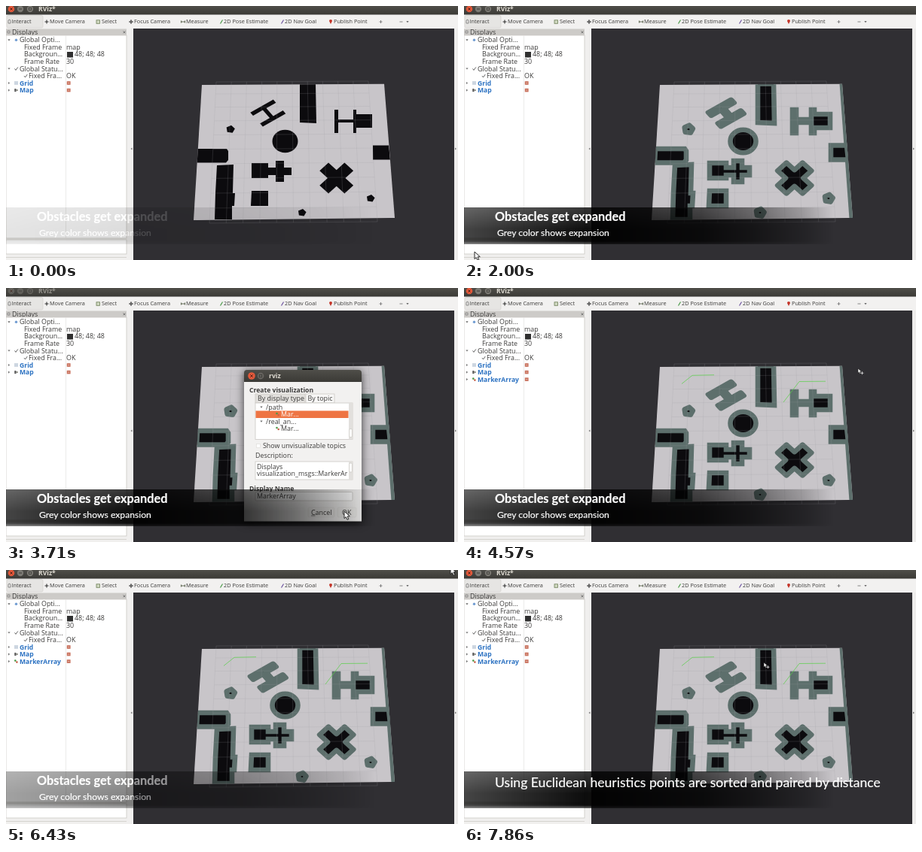
Write an HTML page that moves like this. It is 600 px wide and 338 px high and loops after 8 s.

```html
<!DOCTYPE html>
<html lang="en">
<head>
<meta charset="utf-8">
<title>Obstacle expansion</title>
<style>
  html, body { margin: 0; width: 100%; height: 100%; overflow: hidden; background: #302f33; }
  svg { display: block; width: 100vw; height: 100vh; }
  text { font: 8.9px "Open Sans", "Noto Sans", sans-serif; fill: #3c3b3a; white-space: pre; }
  .b { font-weight: 700; font-size: 8.6px; }
  .tool { font-size: 7.3px; }
  .blue { fill: #2c72c2; }
  .light { fill: #dfdbd2; }
  .title, .sub, .long { font-family: Lato, "Open Sans", sans-serif; fill: #fff; stroke: #fff; stroke-width: .2; }
  .title { font-size: 16.3px; font-weight: 700; }
  .sub { font-size: 12.2px; }
  .long { font-size: 17.6px; }
  #shapes path { fill: #0c0b0e; stroke: #5d6f6c; stroke-width: 0; }
  #shapes.grown path { stroke-width: 6.6; }
  .round { stroke-linejoin: round; }
  #dialog { filter: drop-shadow(0 2px 6px rgba(0,0,0,.7)); }
</style>
</head>
<body>
<svg viewBox="0 0 600 338" preserveAspectRatio="none">
  <defs>
    <linearGradient id="bar" x2="0" y2="1"><stop stop-color="#4f4e49"/><stop offset="1" stop-color="#3b3a36"/></linearGradient>
    <linearGradient id="fade" gradientUnits="userSpaceOnUse" x1="0" x2="490" y1="0" y2="0">
      <stop stop-opacity=".73"/><stop offset=".33" stop-opacity=".95"/><stop offset=".645" stop-opacity=".78"/>
      <stop offset=".785" stop-opacity=".55"/><stop offset=".92" stop-opacity=".25"/><stop offset="1" stop-opacity="0"/>
    </linearGradient>
    <linearGradient id="depth" x2="0" y2="1">
      <stop stop-color="#fff" stop-opacity=".82"/><stop offset=".6" stop-color="#fff"/>
      <stop offset=".92" stop-color="#fff"/><stop offset="1" stop-color="#fff" stop-opacity=".6"/>
    </linearGradient>
    <mask id="soft"><rect y="268" width="600" height="49" fill="url(#depth)"/></mask>
    <clipPath id="floor"><path d="M260 105L502 103.7L516 282L249 285Z"/></clipPath>
    <clipPath id="list"><rect x="331" y="153" width="124" height="61"/></clipPath>
    <clipPath id="note"><rect x="331" y="231" width="122" height="24"/></clipPath>
    <g id="backdrop"><rect y="268" width="490" height="49" fill="url(#fade)" mask="url(#soft)"/></g>
  </defs>

  <rect width="600" height="338" fill="#302f33"/>
  <g id="scene">
    <path d="M260 105L502 103.7L516 282L249 285Z" fill="#c8c5c9"/>
    <g clip-path="url(#floor)">
      <path id="edge" d="M498.5 103H504L518 283L511.5 283Z" fill="#5d6f6c"/>
      <g id="shapes"></g>
    </g>
    <path id="grid" fill="none" stroke="#9d9ba3" stroke-opacity=".32" stroke-width=".6"/>
    <path id="trail" d="M289 127.5L303 116.3L332 115.7M424 152L445 124.5L480 124.2" fill="none" stroke="#58d148" stroke-opacity=".8" stroke-width=".9"/>
  </g>

  <g id="window"></g>
  <g id="dialog">
    <path d="M316 125V113Q316 109 320 109H468Q472 109 472 113V125Z" fill="url(#bar)"/>
    <rect x="316" y="125" width="156" height="185.5" fill="#f2f1f0"/>
    <g id="frame"></g>
    <g id="types"></g>
    <g id="topics"></g>
  </g>

  <g id="first">
    <use href="#backdrop"/>
    <text class="title" x="41" y="286">Obstacles get expanded</text>
    <text class="sub" x="44" y="306">Grey color shows expansion</text>
  </g>
  <g id="second">
    <use href="#backdrop"/>
    <text class="long" x="41" y="289">Using Euclidean heuristics points are sorted and paired by distance</text>
  </g>
  <g id="pointer">
    <path d="M0 0V9.6L2.3 7.6L4 11.3L5.8 10.5L4.2 6.9L7.3 6.7Z" fill="#f4f4f4" stroke="#161616" stroke-width=".9"/>
    <path id="plus" d="M5.5 9.5h6m-3-3v6" stroke="#f4f4f4" stroke-width="1.2"/>
  </g>
</svg>

<script>
const $ = id => document.getElementById(id);
const text = (x, y, s, cls = "", more = "") => `<text x="${x}" y="${y}" class="${cls}" ${more}>${s}</text>`;
const rect = (x, y, w, h, fill, more = "") => `<rect x="${x}" y="${y}" width="${w}" height="${h}" fill="${fill}" ${more}/>`;
const dot = (x, y, r, fill, more = "") => `<circle cx="${x}" cy="${y}" r="${r}" fill="${fill}" ${more}/>`;
const line = (d, stroke, w = 1) => `<path d="${d}" fill="none" stroke="${stroke}" stroke-width="${w}"/>`;
const cross = (x, y, r, c) => line(`M${x - r} ${y - r}l${2 * r} ${2 * r}m0 ${-2 * r}l${-2 * r} ${2 * r}`, c, .9);
const down = (x, y) => `<path d="M${x - 1.6} ${y - 1}h3.2l-1.6 2.2z" fill="#666"/>`;
const right = (x, y) => `<path d="M${x - 1} ${y - 1.6}v3.2l2.2-1.6z" fill="#777"/>`;
const tick = (x, y) => line(`M${x - 2} ${y}l1.5 2l2.8-4`, "#555", .9);
const edge = 'stroke="#cbc8c4" stroke-width=".8"';

// Floor plan
function pentagon(cx, cy, r) {
  const pts = [0, 1, 2, 3, 4].map(i => {
    const a = i * Math.PI * 2 / 5 - 1.4;
    return (cx + r * Math.cos(a)).toFixed(1) + " " + (cy + r * .9 * Math.sin(a)).toFixed(1);
  });
  return `M${pts.join("L")}Z`;
}
const solid = [
  "M390 103.5H411L412 156L390 155Z",
  "M254 190H293L295 193V205L292 208.5H253Z",
  "M487 185.5H508L510 204.5H487Z",
  "M280 212L302 211L301 249H304L303 266H300V284H277L278 249Z",
  "M326 209H348V215H358V206H369V215H379V225H369V234H358V225H348V229H326Z",
  "M326 246H348V266H325Z",
  "M436 138H441V151H461V138H465V144H486V162H465V169H461V155H441V169H436Z"
];
const rounded = [
  ["M-17.5-12.2h35v5.4h-14.8v13.6h14.8v5.4h-35v-5.4h14.8v-13.6h-14.8z", "translate(347.8 142.5) rotate(-29.5) skewX(12)"],
  ["M-8-22.5H8V-8H22.5V8H8V22.5H-8V8H-22.5V-8H-8Z", "translate(438.7 229) scale(1.04 .95) rotate(45)"],
  ["M353.5 180a17 15.3 0 1 0 34 0a17 15.3 0 1 0-34 0z", ""],
  [pentagon(298, 164, 6), ""], [pentagon(393, 275, 5.7), ""], [pentagon(484, 256, 5.7), ""]
];
$("shapes").innerHTML = solid.map(d => `<path d="${d}"/>`).join("") +
  rounded.map(([d, t]) => `<path class="round" d="${d}" transform="${t}"/>`).join("");

let cells = "";
for (let i = 0; i <= 10; i++) {
  const k = i / 10, v = Math.pow(k, 1.07);
  cells += `M${279 + 202 * k} ${101 - k}L${270 + 223 * k} ${289 - 2 * k}`;
  cells += `M${279 - 9 * v} ${101 + 188 * v}L${481 + 12 * v} ${100 + 187 * v}`;
}
$("grid").setAttribute("d", cells);

// Main window
const tools = [[7.5, "Interact"], [58, "Move Camera"], [127, "Select"], [170, "Focus Camera"], [239, "Measure"],
  [289, "2D Pose Estimate"], [370, "2D Nav Goal"], [435, "Publish Point"]];
const rows = [["Global Opti...", 18], ["Fixed Frame", 24, "map"], ["Backgroun...", 24], ["Frame Rate", 24, "30"],
  ["Global Statu...", 18], ["Fixed Fra...", 30, "OK"]];
const rowY = i => 45.2 + 9.55 * i;
const plugin = (i, name) => right(4, rowY(i)) + text(18, rowY(i) + 3.1, name, "b blue") +
  rect(80.8, rowY(i) - 2.3, 4.8, 4.6, "#c8705c") + line(`M82 ${rowY(i)}h2.4`, "#f0d4cb", .7);

$("window").innerHTML =
  rect(0, 0, 600, 11.5, "url(#bar)") + `<g id="caption">` +
  dot(7, 4, 4.3, "#e2583a", 'id="close"') + cross(7, 4, 1.5, "#4a2018") +
  dot(19, 4, 4.2, "#7b7973") + line("M17 4h4", "#3c3b37") +
  dot(32, 4, 4.2, "#7b7973") + `<rect x="30.3" y="2.5" width="3.4" height="3" fill="none" stroke="#3c3b37" stroke-width=".8"/>` +
  text(43, 7.2, "RViz*", "b light") + `</g>` +
  rect(0, 11.5, 600, 18.5, "#f2f1f0") +
  rect(1, 12.5, 48, 16.5, "#e6e5e3", 'rx="2" stroke="#d0cdc9" stroke-width=".6"') +
  tools.map(([x, s]) => text(x, 23.3, s, "tool")).join("") +
  line("M3 23v-4l2-1l1 2v3z", "#777", .8) +
  line("M51.5 21h5m-2.5-2.5v5", "#333", 1.1) +
  `<rect x="120" y="18.8" width="4.5" height="4.5" fill="#cfd8c0" stroke="#6e7f58" stroke-width=".8"/>` +
  line("M163 21h6m-3-3v6", "#444", .9) + dot(166, 21, 1.5, "none", 'stroke="#444" stroke-width=".7"') +
  line("M232.5 21h5m-5-1.5v3m5-3v3", "#5d6650", 1) +
  line("M284.5 23.5l3-5", "#4a9a48", 1.2) + line("M365.5 23.5l3-5", "#6d52a0", 1.2) +
  `<path d="M431 24l-2-4a2 2 0 1 1 4 0z" fill="#c43428"/>` +
  line("M495.5 21h4m-2-2v4", "#777", .9) + line("M522.5 21h4", "#777", .9) + down(533, 21) +
  rect(0, 30, 169, 308, "#f0efee") +
  rect(0, 30.5, 160, 8.5, "#cdcbc8") + text(8, 37.8, "Displays") +
  line("M2 36h3v-3h-3z", "#777", .7) + cross(157, 34.8, 1.4, "#666") +
  rect(0, 39, 160, 270, "#fff", edge) + line("M79.5 39V309", "#e4e3e1", .7) +
  rect(0, 311, 160, 19, "#fff", edge) + line("M0 334.5H160", "#cfccc8", .8) +
  rows.map(([s, x, v], i) => text(x, rowY(i) + 3.1, s) + (v ? text(80, rowY(i) + 3.1, v) : "")).join("") +
  rect(81, 61, 8, 7.5, "#303030") + text(91, rowY(2) + 3.1, "48; 48; 48") +
  down(4, rowY(0)) + down(4, rowY(4)) + dot(13.5, rowY(0), 1.7, "#6f9bd1") +
  tick(13.5, rowY(4)) + tick(26, rowY(5)) +
  plugin(6, "Grid") + line(`M11 ${rowY(6)}h5m-5-1.7h5m-5 3.4h5`, "#8aa0b8", .7) +
  plugin(7, "Map") + rect(11.3, rowY(7) - 2, 2.2, 4, "#555") + rect(13.5, rowY(7) - 1, 2.2, 2, "#8a8a80") +
  `<g id="marker">${plugin(8, "MarkerArray")}${dot(12.3, rowY(8) - 1, 1.3, "#4a9a48")}${dot(14.4, rowY(8) + 1, 1.3, "#c8624a")}</g>` +
  `<path d="M167.5 188.5v3l-2-1.5z" fill="#777"/>` +
  rect(595, 30, 5, 308, "#eeedec") + `<path d="M596 188.5v3l2-1.5z" fill="#777"/>`;

// Dialog
const button = (x, w) => rect(x, 292, w, 13, "#efeeec", 'rx="2" stroke="#e3e1de" stroke-width=".6"');
const tab = (x, w, fill) => rect(x, 141, w, 12, fill, edge);
const bar = (y, h, top, len) => rect(455, y, 5, h, "#e2e0dd") + rect(455.5, top, 4, len, "#fbfbfa", 'rx="1.5" stroke="#c4c1bc" stroke-width=".6"');

$("frame").innerHTML =
  dot(326, 117, 4.8, "#e2583a") + cross(326, 117, 1.7, "#4a2018") +
  dot(338, 117, 4.4, "#66645f") + `<rect x="336.3" y="115.3" width="3.4" height="3.4" fill="none" stroke="#3a3935" stroke-width=".8"/>` +
  text(349, 120.4, "rviz", "b light") + text(323, 138.6, "Create visualization", "b") +
  text(331, 226, "Description:") + text(323, 270.3, "Display Name", "b") +
  rect(331, 271.5, 129, 11.5, "#fff", 'rx="1.5" ' + edge) +
  button(401, 35) + button(440, 25) + text(405, 301.6, "Cancel") + line("M405 303h5.5", "#3c3b3a", .6);

const kinds = [["Axes", "#b87a5a"], ["Camera", "#6a7d90"], ["DepthCloud", "#50545c"], ["Effort", "#3a62a8"], ["FluidPressure", "#c07a30"], ["Grid", "#8aa0b8"]];
$("types").innerHTML =
  tab(331, 66, "#f3dcd0") + tab(398, 38, "#e2e0dd") + text(334, 150, "By display type") + text(400.5, 150, "By topic") +
  rect(331, 153, 129, 61.5, "#fff", edge) + bar(153, 61.5, 154.5, 11) +
  `<g clip-path="url(#list)">` + down(339, 158.5) + rect(345.5, 156.5, 5, 4, "#7199cc") + text(352, 161.7, "rviz") +
  kinds.map(([s, c], i) => {
    const y = 168.2 + 9.55 * i;
    const icon = i ? rect(358.5, y - 1.6, 4.8, 3.4, c) : line(`M361 ${y - 2.5}v3l2.4 1.5m-2.4-1.5l-2.4 1.5`, c, .8);
    return icon + text(365, y + 3.1, s);
  }).join("") + `</g>` +
  rect(331, 231, 129, 21, "#fff", edge) + text(446, 301.6, "OK", "", 'fill-opacity=".5"');

const mark = y => dot(359.5, y - 1, 1.3, "#4a9a48") + dot(361.7, y + 1, 1.3, "#c8624a");
$("topics").innerHTML =
  tab(331, 66, "#e2e0dd") + tab(398, 38, "#f8f7f6") + text(334, 150, "By display type") + text(400.5, 150, "By topic") +
  rect(331, 153, 129, 48.5, "#fff", edge) + bar(153, 48.5, 187.5, 11) +
  `<g id="pick">${rect(331.5, 163.4, 123, 9.6, "#ee7443")}</g>` +
  down(339, 158.5) + text(345, 161.6, "/path") + mark(168) + text(365, 171.2, "Mar...", "", 'id="pickText"') +
  down(339, 177.6) + text(345, 180.8, "/real_an...") + mark(187) + text(365, 190.4, "Mar...") +
  rect(332.5, 207.5, 5, 5, "#fff", 'stroke="#dddbd8" stroke-width=".6"') + text(341, 213.2, "Show unvisualizable topics") +
  rect(331, 231, 129, 24, "#fff", edge) +
  `<g id="filled"><g clip-path="url(#note)">${text(333, 240.6, "Displays")}${text(333, 249.8, "visualization_msgs::MarkerArray")}</g>` +
  bar(231, 24, 233, 12) + text(333, 280.3, "MarkerArray") + `</g>` +
  text(446, 301.6, "OK");

// Timing, in steps of a seventh of a second
const STEP = 1000 / 7, LOOP = 8000;
const path = [[12, 300, 100], [14, 14, 327], [15, 14, 327], [17, 344, 160], [19, 344, 160], [20, 412, 146], [22, 412, 146],
  [23, 380, 166], [24, 380, 166], [25, 449, 297], [28, 449, 297], [34, 560, 12], [35, 584, 10], [38, 590, -4],
  [46, 590, -4], [48, 530, 7], [55, 398, 123]];
const fadeA = [[0, .14], [5, 1], [43, 1], [47, 0]];
const fadeB = [[46, 0], [48, .42], [51, 1]];

function at(keys, s, col = 1) {
  if (s <= keys[0][0]) return keys[0][col];
  for (let i = 1; i < keys.length; i++) {
    const a = keys[i - 1], b = keys[i];
    if (s <= b[0]) return a[col] + (b[col] - a[col]) * (s - a[0]) / (b[0] - a[0]);
  }
  return keys[keys.length - 1][col];
}
const show = (id, on) => { $(id).style.display = on ? "" : "none"; };

function draw(ms) {
  const s = Math.min(55, Math.floor((ms % LOOP + 5) / STEP));
  const open = s >= 15 && s < 27;
  $("shapes").classList.toggle("grown", s >= 7);
  show("edge", s >= 7);
  show("dialog", open);
  $("caption").style.opacity = open ? .5 : 1;
  $("close").style.fill = open ? "#7b7973" : "";
  show("types", s < 21);
  show("topics", s >= 21);
  show("pick", s >= 24);
  show("filled", s >= 24);
  $("pickText").style.fill = s >= 24 ? "#fff" : "";
  show("marker", s >= 28);
  show("trail", s >= 30);
  $("first").style.opacity = at(fadeA, s);
  $("second").style.opacity = at(fadeB, s);

  // The pointer shrinks and gains a plus over the 3D view
  const x = at(path, s), y = at(path, s, 2);
  const inView = !open && x > 169 && y > 30;
  show("pointer", s >= 12);
  show("plus", inView);
  $("pointer").setAttribute("transform", `translate(${x} ${y}) scale(${inView ? .65 : 1})`);
}

const start = performance.now();
function tickFrame(now) {
  draw(Math.max(0, now - start));
  requestAnimationFrame(tickFrame);
}
draw(0);
requestAnimationFrame(tickFrame);
</script>
</body>
</html>
```
